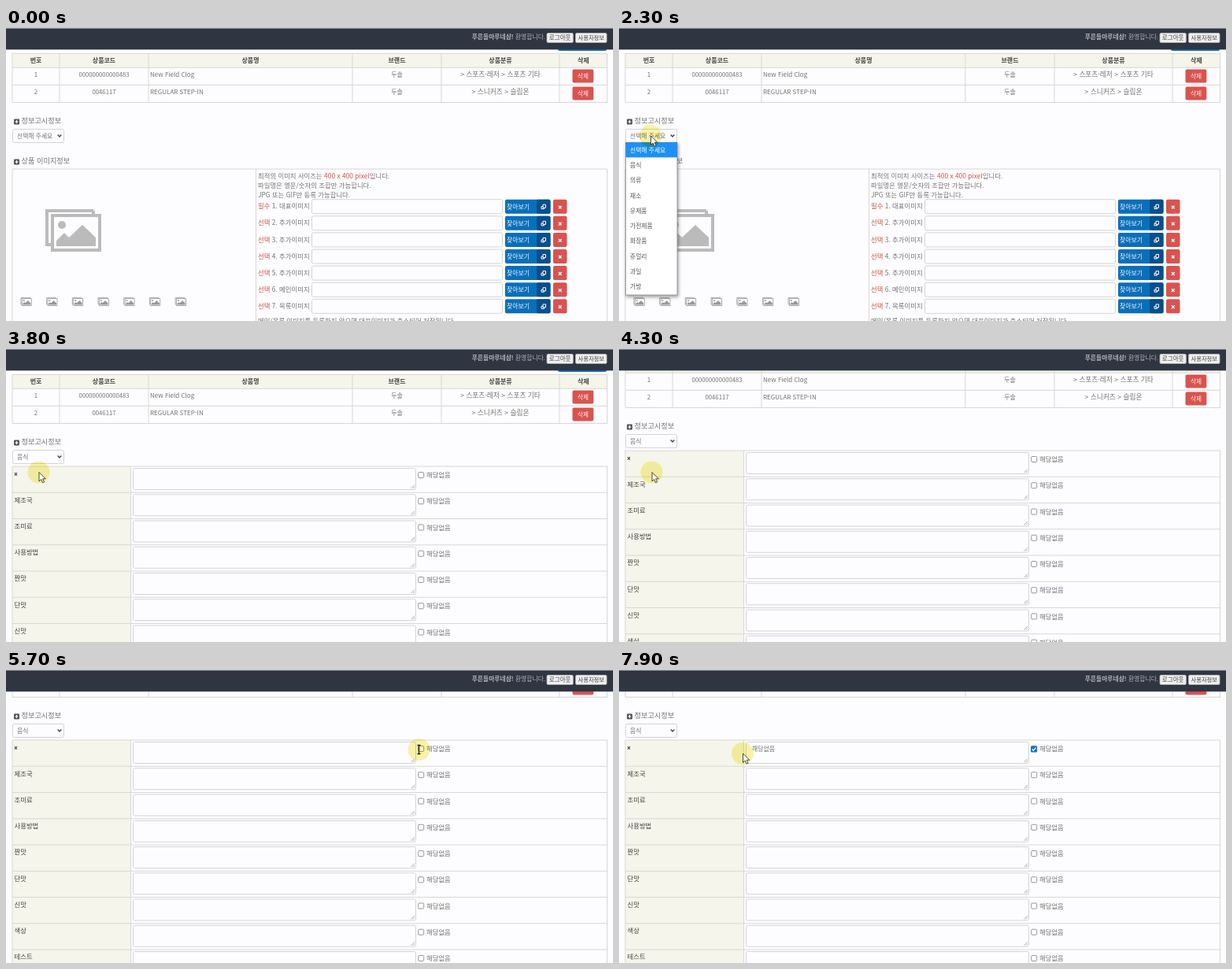
Recreate the animation shown at these times as an HTML page. Size 771x372 px, loop 8000 ms.

```html
<!DOCTYPE html>
<html lang="ko">
<head>
<meta charset="utf-8">
<style>
html, body { margin: 0; width: 100%; height: 100%; overflow: hidden; background: #fdfcfe; }
svg { display: block; width: 771px; height: 372px; }
text { font-family: "Noto Sans CJK KR", "Noto Sans CJK", "Noto Sans", sans-serif; }
#menu { filter: drop-shadow(1px 2px 2px #0006); }
#halo { mix-blend-mode: multiply; }
</style>
</head>
<body>
<svg id="stage" viewBox="0 0 771 372"></svg>
<script>
const PAPER = '#fdfcfe', LINE = '#d8d8d6', RED = '#d9534f', HEAD = '#f5f5eb', GREY = '#737373';
const LOOP = 8000, STEP = 100;

const rect = (x, y, w, h, fill, extra = '') =>
  `<rect x="${x}" y="${y}" width="${w}" height="${h}" fill="${fill}" ${extra}/>`;
const path = (d, stroke, width = 1, extra = '') =>
  `<path d="${d}" fill="none" stroke="${stroke}" stroke-width="${width}" ${extra}/>`;
// Text is placed by the vertical centre of its glyphs.
const text = (x, cy, s, size = 8.4, fill = GREY, extra = '') =>
  `<text x="${x}" y="${cy + size * .37}" font-size="${size}" fill="${fill}" ${extra}>${s}</text>`;
const mid = 'text-anchor="middle"', bold = 'font-weight="700"';
const field = (x, y, w, h) => rect(x, y, w, h, PAPER, 'stroke="#d4d4d6" rx="2"');
const group = (id, body) => `<g id="${id}">${body}</g>`;
const repeat = (n, f) => Array.from({ length: n }, (_, i) => f(i)).join('');

const title = (cy, s) =>
  rect(10, cy - 2.5, 7, 7, '#555', 'rx="1"') +
  path(`M11.5 ${cy + 1}h4M13.5 ${cy - 1}v4`, '#fff', 1.2) + text(19.5, cy, s, 9.2);

function productTable() {
  const cols = [8, 68, 181, 440, 553, 703, 763.5];
  const centre = i => (cols[i] + cols[i + 1]) / 2;
  const heads = ['번호', '상품코드', '상품명', '브랜드', '상품분류', '삭제'];
  const rows = [
    ['1', '000000000000483', 'New Field Clog', '두솔', '&gt; 스포츠·레저 &gt; 스포츠 기타'],
    ['2', '0046117', 'REGULAR STEP-IN', '두솔', '&gt; 스니커즈 &gt; 슬립온']
  ];
  const sizes = [7.8, 7.7, 8, 8, 8.7];
  return rect(701, 20, 62, 9, '#1272b8', 'rx="2"') +
    rect(8, 33, 755, 17, HEAD) +
    path([32.5, 50.3, 72.3, 94.5].map(y => `M8 ${y}h756`).join('') +
      cols.map(x => `M${x} 32v62`).join(''), LINE) +
    heads.map((s, i) => text(centre(i), 41.5, s, 8, '#444', mid + bold)).join('') +
    rows.map((row, r) => row.map((s, i) => i == 2
      ? text(183, 59 + 22 * r, s, sizes[i])
      : text(centre(i), 59 + 22 * r, s, sizes[i], GREY, mid)).join('') +
      rect(719.5, 52.6 + 22 * r, 26.8, 17, RED, 'rx="2"') +
      text(733, 61.2 + 22 * r, '삭제', 7.6, '#fbeeee', mid)).join('');
}

const picture = (x, y, scale, color) =>
  `<g transform="translate(${x} ${y}) scale(${scale})">` +
  path('M61 2H2V45H7M61 2V6', color, 4) +
  rect(9, 8, 60, 44, PAPER, `stroke="${color}" stroke-width="4"`) +
  `<circle cx="21" cy="20" r="5" fill="${color}"/>` +
  `<path d="M14 47V40L24 30L30 36L47 20L64 36V47Z" fill="${color}"/></g>`;

function imageForm() {
  const kinds = ['대표', '추가', '추가', '추가', '추가', '메인', '목록'];
  const red = s => `<tspan fill="#d0544a">${s}</tspan>`;
  return title(169, '상품 이미지정보') +
    path('M8 400V179H763.5V400M317.5 179V400', LINE) +
    picture(50, 230, 1, '#bbb') +
    repeat(7, i => picture(18.5 + 32.7 * i, 342, .2, '#999')) +
    text(320, 188, `최적의 이미지 사이즈는 ${red('400 x 400 pixel')}입니다.`) +
    text(320, 200, '파일명은 영문/숫자의 조합만 가능합니다.') +
    text(320, 212, 'JPG 또는 GIF만 등록 가능합니다.') +
    repeat(7, i => {
      const y = 226.7 + 21.1 * i, top = y - 9;
      return text(320, y - .5, `${red(i ? '선택' : '필수')} ${i + 1}. ${kinds[i]}이미지`) +
        field(388.5, top, 242, 18) +
        rect(634, top, 57.5, 18, '#0a6fba', 'rx="2"') +
        rect(674, top, 17.5, 18, '#084f8b', 'rx="2"') +
        text(636, y, '찾아보기', 7.9, '#f0f5fa') +
        path(`M682 ${y - 2.5}h3.5v4h-3.5zM682 ${y}h-2v3h3.5v-1.5`, '#fff', 1) +
        rect(695, top, 17.5, 18, RED, 'rx="2"') +
        path(`M702 ${y - 1}l3.6 3.6m0 -3.6l-3.6 3.6`, '#fff', 1.4);
    }) +
    text(320, 372, '메인/목록 이미지를 등록하지 않으면 대표이미지가 축소되어 저장됩니다.');
}

function detailForm() {
  const labels = ['', '제조국', '조미료', '사용방법', '짠맛', '단맛', '신맛', '색상', '테스트'];
  return rect(8, 149, 151, 320, HEAD) + path('M8 149V450M158.5 149V450M763.5 149V450', LINE) +
    labels.map((s, i) => {
      const y = 149 + 33.25 * i;
      return path(`M8 ${y}h756`, LINE) +
        (s ? text(10.5, y + 9.3, s, 8.4, '#444', 'font-weight="500"')
           : path(`M11 ${y + 8.2}l3 3.4m0 -3.4l-3 3.4`, '#444', 1.1)) +
        field(161.5, y + 2.5, 359, 27) +
        path(`M514.5 ${y + 28}l4.5 -4.5m-2 4.5l2 -2`, '#999', .8) +
        rect(523.7, y + 7.5, 7, 7, '#fff', 'stroke="#8c8c8c" stroke-width=".9" rx="1.2"') +
        text(534, y + 11, '해당없음');
    }).join('') +
    group('checked', rect(523, 156.5, 8, 8, '#1474d8', 'rx="1.2"') +
      path('M524.7 160.5l1.7 1.8l3 -3.6', '#fff', 1.3) + text(169, 160.3, '해당없음', 7.9));
}

function menu() {
  const items = ['선택해 주세요', '음식', '의류', '채소', '유제품', '가전제품', '화장품', '쥬얼리', '과일', '가방'];
  return rect(8.5, 145.5, 65.5, 193.5, '#fff', 'stroke="#999"') +
    rect(8.5, 145, 65.5, 19.3, '#1e90f5', 'id="hover"') +
    items.map((s, i) => text(14, 154.8 + 19.28 * i, s, 7.8, '#555', 'class="item"')).join('');
}

const button = (x, w, s, size) =>
  rect(x, 6.5, w, 12, '#efefef', 'stroke="#b5b5b5" stroke-width=".8" rx="1.5"') +
  text(x + w / 2, 12.5, s, size, '#444', mid);
const header = rect(0, 0, 771, 27.4, '#2f3541') + rect(0, 0, 771, 1, '#898c95') +
  text(685, 11.5, '<tspan font-weight="700">푸른들마루네샵!</tspan> 환영합니다.', 7.8, '#b0b3b9', 'text-anchor="end"') +
  button(687, 33.3, '로그아웃', 7.5) + button(723.5, 39.5, '사용자정보', 7.3);

const cursor = '<circle id="halo" r="14" fill="#f9f28c" opacity=".75"/>' +
  '<g id="pointer"><circle id="press" r="3.2" fill="#d8232a"/>' +
  '<path id="arrow" d="M.5 0V11.5L3.2 9L5 13.3L7 12.4L5.2 8.3H8.8Z" fill="#fff" stroke="#333" stroke-width=".9"/>' +
  path('M-2 -5.5H2M0 -5.5V5.5M-2 5.5H2', '#222', 1.4, 'id="beam"') + '</g>';

document.getElementById('stage').innerHTML =
  group('page', productTable() + title(118, '정보고시정보') +
    field(8.5, 128.5, 65, 17) + text(14, 136.7, '', 7.8, GREY, 'id="choice"') +
    path('M65.7 135.5l2.3 2.5l2.3 -2.5', '#444', 1.3) +
    group('images', imageForm()) + group('details', detailForm()) + group('menu', menu())) +
  header + cursor;

const $ = id => document.getElementById(id);
const show = (id, on) => $(id).setAttribute('visibility', on ? 'visible' : 'hidden');
const items = document.querySelectorAll('.item');

// Pointer path: time, x, y
const route = [
  [0, -30, 74], [100, -13.4, 74], [200, -13.4, 74], [300, -30, 90], [500, -30, 130],
  [600, -6, 130], [1000, 40, 137], [2300, 40, 137], [3000, 42, 169],
  [3300, 42, 169], [3800, 41.5, 156.5], [5200, 41.5, 156.5], [5400, 150, 225],
  [5500, 330, 246], [5600, 470, 190], [5700, 524.5, 101], [6100, 528, 102],
  [6600, 528, 102], [6900, 529.5, 137.5], [7000, 529.5, 137.5], [7900, 157, 106], [8000, 157, 106]
];
const presses = [[1100, 1500], [3200, 3400], [6200, 6500], [6800, 7100]];
const within = (t, a, b) => t >= a && t < b;

function pointerAt(t) {
  const i = route.findIndex(k => k[0] > t);
  const [t0, x0, y0] = route[i - 1], [t1, x1, y1] = route[i];
  let p = (t - t0) / (t1 - t0);
  p = p * p * (3 - 2 * p);
  return [x0 + (x1 - x0) * p, y0 + (y1 - y0) * p];
}

function draw(now) {
  const t = Math.floor(now % LOOP / STEP) * STEP;
  const [x, y] = pointerAt(t);
  const chosen = t >= 3400, open = within(t, 1200, 3400), over = y > 164 ? 1 : 0;
  const beam = within(t, 5400, 5800) || within(t, 7200, 7800);
  const scroll = 20 * Math.max(0, Math.min(3, (t - 4200) / STEP));

  $('page').setAttribute('transform', `translate(0 ${-scroll})`);
  $('choice').textContent = chosen ? '음식' : '선택해 주세요';
  show('images', !chosen);
  show('details', chosen);
  show('checked', t >= 6300);
  show('menu', open);
  $('hover').setAttribute('y', 145 + 19.3 * over);
  items.forEach((el, i) => el.setAttribute('fill', i == over ? '#fff' : '#555'));

  for (const id of ['halo', 'pointer']) $(id).setAttribute('transform', `translate(${x} ${y})`);
  show('press', presses.some(([a, b]) => within(t, a, b)));
  show('arrow', !beam);
  show('beam', beam);
  requestAnimationFrame(() => draw(performance.now() - start));
}
const start = performance.now();
draw(0);
</script>
</body>
</html>
```
